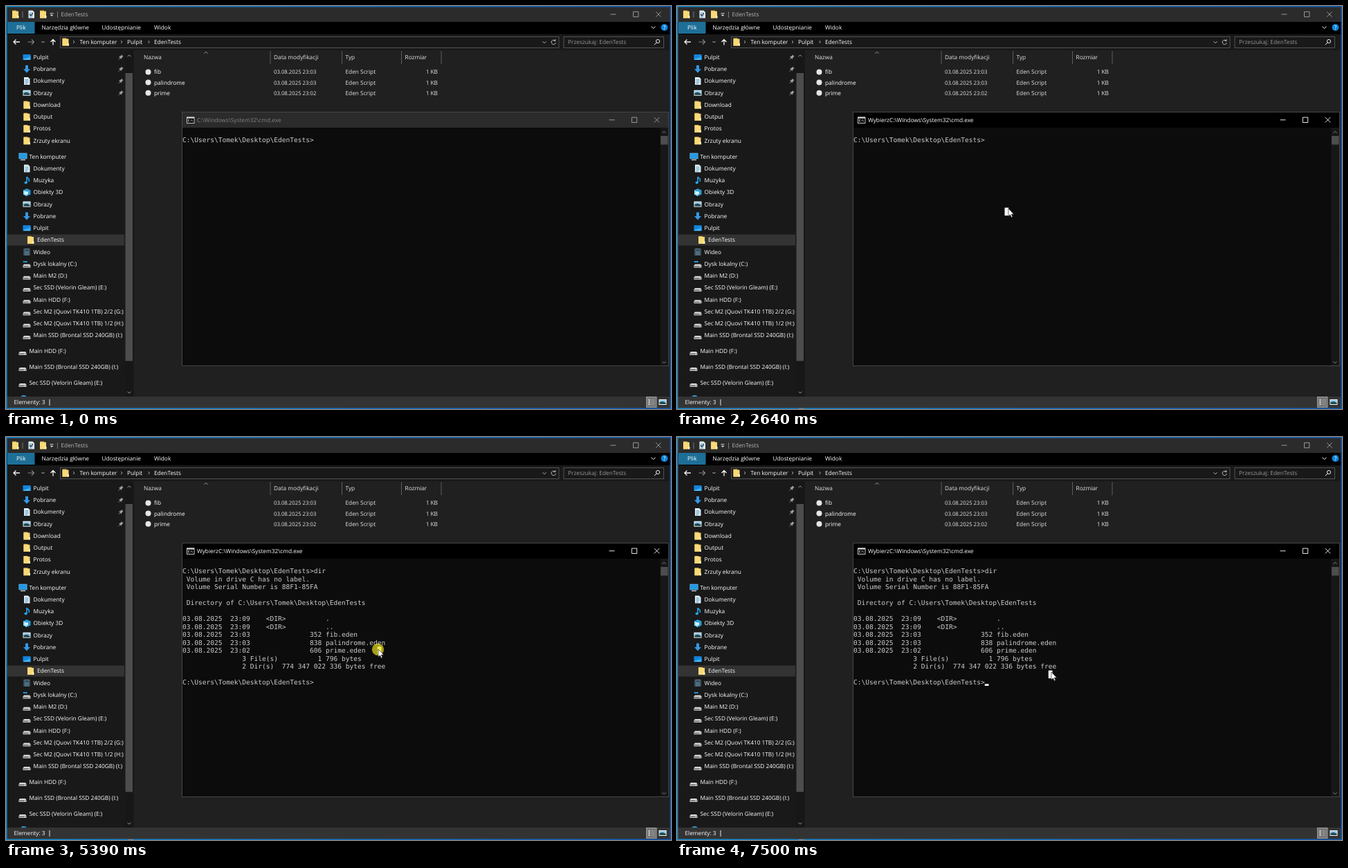
Recreate the animation shown at these times as an HTML page. Size 961 by 583 pixels, loop 8 s.

```html
<!DOCTYPE html>
<html lang="pl">
<head>
<meta charset="utf-8">
<title>EdenTests</title>
<style>
  html, body { margin: 0; width: 100%; height: 100%; overflow: hidden; background: #202020; }
  svg { display: block; width: 100%; height: 100%; }
  text { font: 8.3px "Open Sans", "Noto Sans", sans-serif; fill: #fff; white-space: pre; text-rendering: geometricPrecision; }
  .date { font-size: 7.75px; }
  .dim { fill: #e4e4e4; }
  .con text { font: 9.55px "DejaVu Sans Mono", monospace; fill: #ccc; }
  .con.dark text { fill: #0c0c0c; }
  .line { fill: none; stroke: #e8e8e8; stroke-width: 1; }
  #chevrons { fill: none; stroke: #8a8a8a; stroke-width: .9; }
</style>
</head>
<body>
<svg id="stage" viewBox="0 0 961 583" preserveAspectRatio="none"></svg>
<script>
const LOOP = 8000;
const CELL = 5.75, LINE = 11.5, LEFT = 255, TOP = 188.2, COLS = 120;
const PROMPT = 'C:\\Users\\Tomek\\Desktop\\EdenTests>';
const CMD = 'C:\\Windows\\System32\\cmd.exe';

const esc = s => s.replace(/&/g, '&amp;').replace(/</g, '&lt;');
const rect = (x, y, w, h, fill, more = '') => `<rect x="${x}" y="${y}" width="${w}" height="${h}" fill="${fill}" ${more}/>`;
const path = (d, more = 'class="line"') => `<path d="${d}" ${more}/>`;
const text = (x, mid, s, more = '') => `<text x="${x}" y="${mid + 2.9}" xml:space="preserve" ${more}>${esc(s)}</text>`;
const stroke = (color, w = 1) => `fill="none" stroke="${color}" stroke-width="${w}"`;
const at = (x, y, body) => `<g transform="translate(${x} ${y})">${body}</g>`;
const right = (x, y, r = 2) => `M${x - r / 2} ${y - r}l${r} ${r}l${-r} ${r}`;
const down = (x, y, r = 2.5) => `M${x - r} ${y - r / 2}l${r} ${r}l${r} ${-r}`;
const up = (x, y, r = 2.5) => `M${x - r} ${y + r / 2}l${r} ${-r}l${r} ${r}`;

// Icons are drawn around their own centre.
const icons = {
  folder: rect(-4.5, -5.5, 6, 11, '#e9b850') + path('M-4.5-4.5H4.5V5.5H-4.5Z', 'fill="#f9d978"') + rect(2.5, 2, 2.5, 3.5, '#fff0b5'),
  desktop: rect(-5.5, -4, 11, 8, '#1384dc') + path('M-5.5 4L5.5-2V4Z', 'fill="#28a5f3"') + rect(-4.5, 2.5, 9, .8, '#86d1ff'),
  download: path('M-2-5.5H2V0H5L0 5.5L-5 0H-2Z', 'fill="#3398e8"'),
  doc: path('M-4-5.5H2L4.5-3V5.5H-4Z', 'fill="#e3edf3"') + path('M-2.5-2H2.5M-2.5 0H2.5M-2.5 2H2.5M-2.5 4H1', stroke('#4a9ac9', .9)),
  image: rect(-5.5, -4, 11, 8, '#f2f6f8') + rect(-4.5, -3, 9, 6, '#8cc4e6') + path('M-4.5 3V0L0-1L4.5 1V3Z', 'fill="#23484d"'),
  pc: rect(-5.5, -5, 12, 8.5, '#7fc8f2') + rect(-4.9, -4.4, 10.8, 7.3, '#2498e5') + rect(-3, 4.2, 7, 1.3, '#c4d2da'),
  music: path('M0 3V-5Q1-3 3-2Q4 0 3 2', stroke('#2aa6f5', 1.5)) + '<ellipse cx="-1.3" cy="3.4" rx="2.2" ry="1.8" fill="#2aa6f5"/>',
  cube: path('M-5-3L0-5.5L5.5-3V3L0 5.5L-5 3Z', 'fill="#2b9cd5"') + path('M-5-3L0-1V5.5L-5 3Z', 'fill="#86d9f5"') + rect(-3, -1, 5, 4, '#d9f4fb'),
  film: rect(-4.5, -5, 9, 10, '#6d7980') + rect(-2.5, -4, 5, 3.5, '#28506c') + rect(-2.5, .5, 5, 3.5, '#346f94') + path('M-3.5-5V5M3.5-5V5', 'stroke="#222" stroke-dasharray="1 1"'),
  drive: path('M-4 .5H4L5.5 2.5V5.5H-5.5V2.5Z', 'fill="#d6d6d6"') + rect(-5, 3, 10, 1.6, '#6a6a6a') + rect(2.5, 3.3, 1.6, 1, '#e8ffe8'),
};
icons.system = icons.drive + path('M-5-4H-2.5V-2H-5ZM-2-4H.5V-2H-2Z', 'fill="#2aa6f5"');
const icon = (name, x, y) => at(x, y, icons[name]);

// [label, icon, indent, marker]
const quick = [
  ['Pulpit', 'desktop', 0, 'pin'], ['Pobrane', 'download', 0, 'pin'], ['Dokumenty', 'doc', 0, 'pin'], ['Obrazy', 'image', 0, 'pin'],
  ['Download', 'folder', 0], ['Output', 'folder', 0], ['Protos', 'folder', 0], ['Zrzuty ekranu', 'folder', 0]];
const computer = [
  ['Ten komputer', 'pc', -6, 'open'], ['Dokumenty', 'doc', 0, 'shut'], ['Muzyka', 'music', 0, 'shut'], ['Obiekty 3D', 'cube', 0, 'shut'],
  ['Obrazy', 'image', 0, 'shut'], ['Pobrane', 'download', 0, 'shut'], ['Pulpit', 'desktop', 0, 'open'], ['EdenTests', 'folder', 5.5],
  ['Wideo', 'film', 0, 'shut'], ['Dysk lokalny (C:)', 'system', 0, 'shut'], ['Main M2 (D:)', 'drive', 0, 'shut'],
  ['Sec SSD (Velorin Gleam) (E:)', 'drive', 0, 'shut'], ['Main HDD (F:)', 'drive', 0, 'shut'],
  ['Sec M2 (Quovi TK410 1TB) 2/2 (G:)', 'drive', 0, 'shut'], ['Sec M2 (Quovi TK410 1TB) 1/2 (H:)', 'drive', 0, 'shut'],
  ['Main SSD (Brontal SSD 240GB) (I:)', 'drive', 0, 'shut']];
const drives = [
  ['Main HDD (F:)', 'drive', -6, 'shut'], ['Main SSD (Brontal SSD 240GB) (I:)', 'drive', -6, 'shut'], ['Sec SSD (Velorin Gleam) (E:)', 'drive', -6, 'shut']];
const place = (list, y, step) => list.map(([label, name, indent, mark], i) => ({ label, name, indent, mark, y: y + i * step }));
const rows = [...place(quick, 74, 17.25), ...place(computer, 217.7, 17.25), ...place(drives, 499.5, 23)];

const pin = y => at(166, y, path('M1-3.5L3.5-1L2.5-.5L1 1.5L.7 3L-3-.7L-1.5-1L.5-2.5Z', 'fill="#a0a0a0"') + path('M-1 1L-3.5 3.5', stroke('#a0a0a0', .8)));

function sidebar() {
  const items = rows.map(r => icon(r.name, 30 + r.indent, r.y) + text(39.5 + r.indent, r.y, r.label) + (r.mark === 'pin' ? pin(r.y) : ''));
  const marks = rows.map(r => {
    const x = 15 + r.indent;
    return r.mark === 'open' ? down(x, r.y) : r.mark === 'shut' ? right(x, r.y, 2.3) : '';
  });
  return rect(2, 64, 183, 501, '#191919') + rect(2, 330.5, 169, 16, '#333') + rect(2, 0, 169.5, 17, '#4d4d4d', 'id="hover"')
    + items.join('') + path('M21 565Q25.5 561 30 565Z', 'fill="#3a9bd5"')
    + path(marks.join(''), 'id="chevrons"')
    + rect(172.5, 64, 11.5, 501, '#171717') + rect(172.5, 97, 10.5, 416.5, '#4d4d4d')
    + path(up(178, 72) + down(178, 559), stroke('#9a9a9a'));
}

const buttons = (x, y, gap) => path(`M${x - 4} ${y}h8M${x + gap - 3.7} ${y - 3.7}h7.4v7.4h-7.4ZM${x + 2 * gap - 3.7} ${y - 3.7}l7.4 7.4m0-7.4l-7.4 7.4`, 'fill="none" stroke="#a5a5a5" stroke-width=".9"');

function topBars() {
  return rect(0, 0, 961, 23, '#2b2b2b') + icon('folder', 13.5, 12) + icon('doc', 36.5, 12) + path('M34 12l2 2l3-4', stroke('#222', 1.1)) + icon('folder', 53.5, 12)
    + path('M24 8V17M74.5 8V17', stroke('#777')) + path('M63.5 10.5h5', stroke('#ddd', .9)) + path('M63.5 12.5h5l-2.5 2.5Z', 'fill="#ddd"')
    + text(79.5, 12, 'EdenTests', 'style="fill:#b5b5b5"') + buttons(877.5, 12, 32.7)
    + rect(0, 23, 961, 18, '#000') + rect(2, 23, 39.5, 17, '#1d6f97')
    + text(15, 31.5, 'Plik') + text(51.5, 31.5, 'Narzędzia główne') + text(138.5, 31.5, 'Udostępnianie') + text(214, 31.5, 'Widok')
    + path(down(935.5, 31, 3)) + '<circle cx="951.5" cy="31" r="5" fill="#0f84d8"/>' + text(949.7, 31, '?', 'font-weight="700"')
    + rect(0, 41, 961, 23, '#191919')
    + path('M20 52H11M14.5 48.5L11 52l3.5 3.5M68 56.5V48.5M64.5 52l3.5-3.5l3.5 3.5', stroke('#f2f2f2', 1.3))
    + path('M31.5 52h9M37 48.5l3.5 3.5l-3.5 3.5', stroke('#858585', 1.2)) + path(down(53.5, 52, 2), stroke('#ccc'))
    + rect(78.5, 44.5, 720.5, 16, '#191919', 'stroke="#535353"') + icon('folder', 86, 52)
    + path(right(98, 52) + right(167, 52) + right(206.5, 52), stroke('#bbb', .9))
    + text(106.5, 52, 'Ten komputer') + text(175, 52, 'Pulpit') + text(214, 52, 'EdenTests')
    + path(down(778, 52.5) + 'M793.5 50A3.2 3.2 0 1 0 794.5 53M794 48v2.5h-2.5', stroke('#bbb'))
    + rect(806, 44.5, 144.5, 16, '#191919', 'stroke="#535353"') + text(812, 52, 'Przeszukaj: EdenTests', 'style="fill:#999"')
    + '<circle cx="942" cy="51" r="2.6" class="line"/>' + path('M940 53l-3.2 3.2');
}

function fileList() {
  const files = [['fib', '03'], ['palindrome', '03'], ['prime', '02']].map(([name, min], i) => {
    const y = 95.4 + i * 15.2;
    return `<circle cx="205.5" cy="${y}" r="4" fill="#e6e6e6"/>` + text(214, y, name) + text(387, y, `03.08.2025 23:${min}`, 'class="date dim"')
      + text(490.5, y, 'Eden Script', 'class="dim"') + text(624, y, '1 KB', 'class="dim" text-anchor="end"');
  });
  return path('M382 65V84M485.5 65V84M571.5 65V84M629 65V84', stroke('#5c5c5c')) + path(up(289, 67.5), stroke('#aaa', .9))
    + text(199, 74.5, 'Nazwa', 'class="dim"') + text(387, 74.5, 'Data modyfikacji', 'class="dim"') + text(490.5, 74.5, 'Typ', 'class="dim"') + text(576.5, 74.5, 'Rozmiar', 'class="dim"')
    + files.join('');
}

function statusBar() {
  return rect(0, 565, 961, 18, '#333') + text(11.5, 573.3, 'Elementy: 3') + path('M63 569V578')
    + rect(925.5, 565.5, 14.5, 15, '#777', 'stroke="#999"') + path('M928.5 570h2M928.5 573h2M928.5 576h2', stroke('#fff', 1.5))
    + path('M932.5 570h5M932.5 573h5M932.5 576h5', stroke('#aaa', .8)) + icon('image', 949, 573);
}

function windowEdge() {
  return '<linearGradient id="edgeTint"><stop stop-color="#1788cc"/><stop offset="1" stop-color="#1559b4"/></linearGradient>'
    + rect(.75, .75, 959.5, 581.5, 'none', 'stroke="url(#edgeTint)" stroke-width="1.5"');
}

const output = [
  ' Volume in drive C has no label.', ' Volume Serial Number is 88F1-85FA', '',
  ' Directory of ' + PROMPT.slice(0, -1), '',
  '03.08.2025  23:09    <DIR>          .', '03.08.2025  23:09    <DIR>          ..',
  '03.08.2025  23:03               352 fib.eden', '03.08.2025  23:03               838 palindrome.eden', '03.08.2025  23:02               606 prime.eden',
  '               3 File(s)          1 796 bytes', '               2 Dir(s)  774 347 022 336 bytes free', '', PROMPT];
const conLine = (s, row, more = '') => `<text x="${LEFT}" y="${TOP + row * LINE + 9}" xml:space="preserve" ${more}>${esc(s)}</text>`;
const conText = conLine(PROMPT, 0, 'class="typed"') + '<g class="output">' + output.map((s, i) => conLine(s, i + 1)).join('') + '</g>';

function consoleWindow() {
  return rect(254.5, 153.5, 703, 367, '#0c0c0c', 'stroke="#454545"') + rect(255, 154, 702, 22, '#2b2b2b', 'id="bar"')
    + rect(261.5, 161, 10.5, 8.5, '#050505', 'stroke="#d8d8d8" stroke-width=".9"') + rect(261.5, 160.6, 10.5, 2, '#d8d8d8')
    + path('M265 164.5h-1.5v2.5h1.5M266.7 165v.8M266.7 166.5v.7M268 164.3l1.5 3', stroke('#eee', .7))
    + text(276, 165, CMD, 'id="title"') + '<g id="cmdButtons">' + buttons(875.5, 164.8, 32.5) + '</g>'
    + rect(945.5, 176, 11.5, 344, '#171717') + rect(946, 188, 10.5, 12.5, '#4d4d4d') + path(up(951, 182.5) + down(951, 515.5), stroke('#858585'))
    + `<g class="con">${conText}</g>` + path('', 'id="selection" fill="#f2f2f2"')
    + `<clipPath id="clip"><path id="clipShape"/></clipPath><g clip-path="url(#clip)"><g class="con dark">${conText}</g></g>`
    + rect(0, 0, CELL, 2.8, '#f2f2f2', 'id="caret"');
}

const $ = id => document.getElementById(id);
$('stage').innerHTML = rect(0, 0, 961, 583, '#202020') + topBars() + sidebar() + fileList() + statusBar()
  + windowEdge() + rect(176, 582, 8, 1, '#a07f78', 'id="edge"')
  + consoleWindow()
  + '<circle id="press" r="8.6" fill="#f0e418" opacity=".68"/>'
  + path('M0 0V11.2L2.5 8.9L4.2 12.8L6 12L4.3 8.2H7.8Z', 'id="mouse" fill="#fff" stroke="#111" stroke-width=".6"');

// Pointer stops: time, x, y.
const stops = [
  [600, 175, 583], [735, 70, 514], [780, 70, 514], [1380, 481, 170], [1420, 481, 170], [1500, 485, 168], [1690, 485, 168],
  [1980, 479, 293], [4670, 479, 293], [5340, 538, 307], [5470, 538, 307], [5890, 361, 281], [6100, 361, 281],
  [6280, 494, 302], [6420, 494, 302], [6880, 488, 318], [6910, 488, 318], [7040, 541, 340], [LOOP, 541, 340]];
const presses = [[1510, 1690], [1990, 2090], [5370, 6090], [7040, 7190]];
const selecting = [[1990, 3050], [5370, LOOP]];
// Caret: from, to, column, row.
const carets = [
  [2100, 2640, 33, 0], [3050, 3120, 34, 0], [3120, 3260, 35, 0], [3260, 3660, 36, 0],
  [3660, 4200, 33, 14], [4735, 5270, 33, 14], [6430, 6970, 33, 14], [7500, LOOP, 33, 14]];

const during = (spans, t) => spans.find(([a, b]) => t >= a && t < b);
const clamp = v => Math.max(0, Math.min(1, v));
const smooth = p => p * p * (3 - 2 * p);
const show = (el, on) => el.style.display = on ? '' : 'none';

function pointer(t) {
  const i = Math.max(1, stops.findIndex(s => s[0] > t));
  const [t0, x0, y0] = stops[i - 1], [t1, x1, y1] = stops[i];
  const p = smooth(clamp((t - t0) / (t1 - t0)));
  return [x0 + (x1 - x0) * p, y0 + (y1 - y0) * p];
}

const cellAt = t => {
  const [x, y] = pointer(t);
  return Math.floor((y - TOP) / LINE) * COLS + Math.floor((x - LEFT) / CELL);
};

function selectionPath(t) {
  const span = during(selecting, t);
  if (!span) return '';
  let from = cellAt(span[0]), to = from;
  if (t >= 7040) from = to = cellAt(7040);
  else if (t >= 5470) to = cellAt(Math.min(t, 5900));
  const first = Math.min(from, to), last = Math.max(from, to);
  let d = '';
  for (let row = Math.floor(first / COLS); row * COLS <= last; row++) {
    const a = Math.max(first - row * COLS, 0), b = Math.min(last - row * COLS + 1, COLS);
    d += `M${LEFT + a * CELL} ${TOP + row * LINE}h${(b - a) * CELL}v${LINE}h${(a - b) * CELL}Z`;
  }
  return d;
}

function render(t) {
  const [x, y] = pointer(t), active = t >= 1510;
  show($('mouse'), t >= 600);
  show($('edge'), t >= 600);
  $('mouse').setAttribute('transform', `translate(${x} ${y})`);
  show($('press'), during(presses, t));
  $('press').setAttribute('cx', x - .5);
  $('press').setAttribute('cy', y + .3);

  const over = t >= 600 && x < 172 && rows.find(r => Math.abs(r.y - y) < 8.7);
  show($('hover'), over);
  if (over) $('hover').setAttribute('y', over.y - 8.5);
  $('chevrons').style.opacity = Math.min(clamp((t - 600) / 320), clamp((1350 - t) / 300));

  $('bar').setAttribute('fill', active ? '#000' : '#2b2b2b');
  $('title').style.fill = active ? '#fff' : '#858080';
  $('title').textContent = (during(selecting, t) ? 'Wybierz' : '') + CMD;
  $('cmdButtons').firstChild.setAttribute('stroke', active ? '#fff' : '#a5a5a5');

  const typed = [3050, 3120, 3260].filter(k => t >= k).length;
  document.querySelectorAll('.typed').forEach(el => el.textContent = PROMPT + 'dir'.slice(0, typed));
  document.querySelectorAll('.output').forEach(el => show(el, t >= 3660));

  const d = selectionPath(t);
  $('selection').setAttribute('d', d);
  $('clipShape').setAttribute('d', d);

  const caret = during(carets, t);
  show($('caret'), caret);
  if (caret) $('caret').setAttribute('transform', `translate(${LEFT + caret[2] * CELL} ${TOP + caret[3] * LINE + 8})`);
}

const start = performance.now();
function tick() {
  render((performance.now() - start) % LOOP);
  requestAnimationFrame(tick);
}
tick();
</script>
</body>
</html>
```
